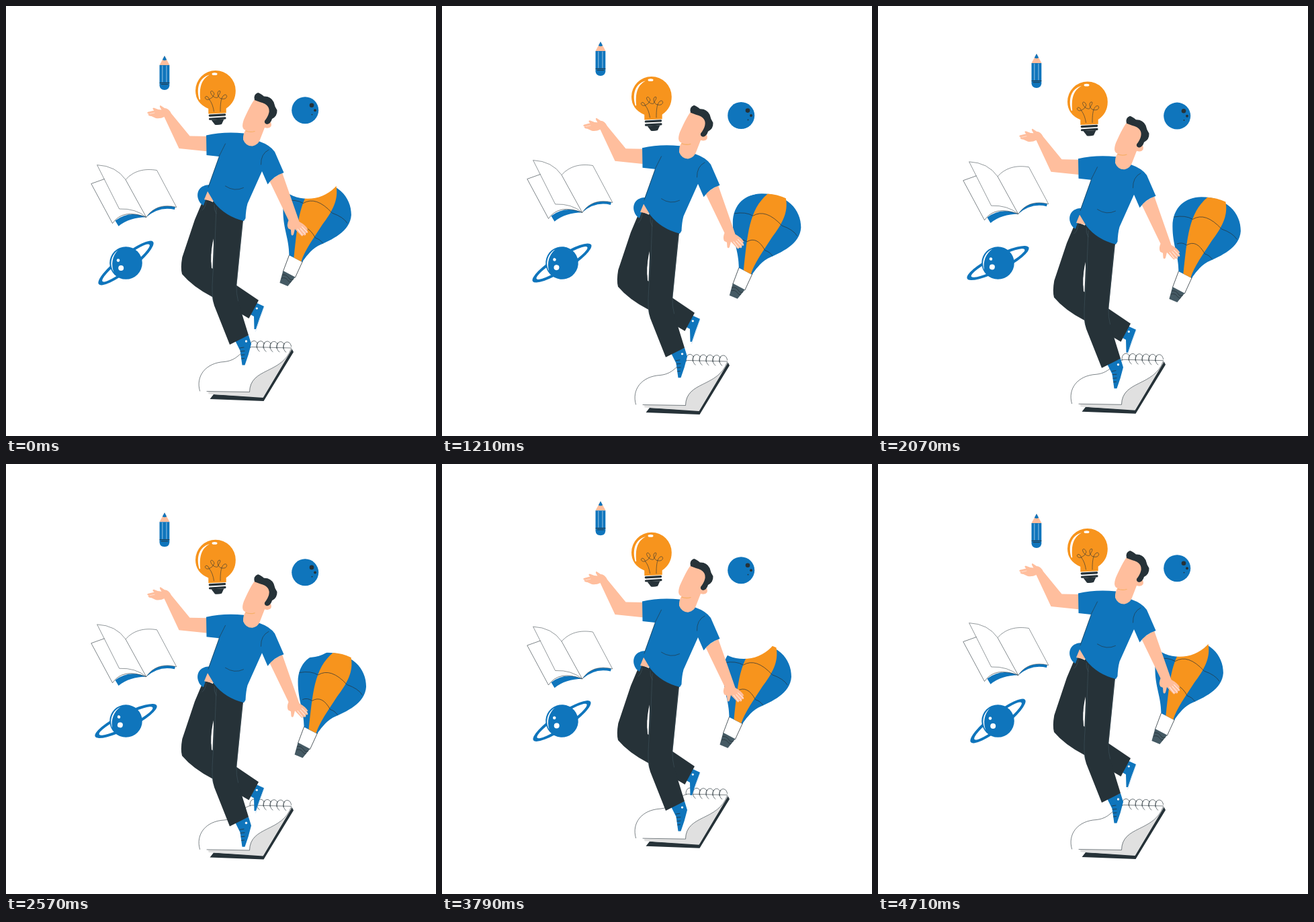
These frames come from a looping animation (640 by 640 pixels, 4.78 s). An HTML page with a canvas:

```html
<!DOCTYPE html>
<html lang="en">
<head>
<meta charset="utf-8">
<title>Balancing ideas</title>
<style>
html, body { margin: 0; width: 100%; height: 100%; overflow: hidden; background: #fff; }
canvas { display: block; width: 100vw; height: 100vh; }
</style>
</head>
<body>
<canvas id="stage" width="640" height="640"></canvas>
<script>
const ctx = document.getElementById('stage').getContext('2d');
const BLUE = '#0f75bc', ORANGE = '#f7941d', DARK = '#263238', SKIN = '#ffbe9d';
const GREY = '#e0e0e0', SLATE = '#455a64', WHITE = '#fff';
const LOOP = 4780, FPS = 14, SPAN = 66;

const fill = (color, d) => {
  const path = new Path2D(d);
  return () => { ctx.fillStyle = color; ctx.fill(path); };
};
const line = (d, width = 0.7, color = DARK) => {
  const path = new Path2D(d);
  return () => { ctx.strokeStyle = color; ctx.lineWidth = width; ctx.stroke(path); };
};
const oval = (color, x, y, rx, ry = rx, turn = 0) => () => {
  ctx.fillStyle = color;
  ctx.beginPath();
  ctx.ellipse(x, y, rx, ry, turn, 0, Math.PI * 2);
  ctx.fill();
};

const pencil = [
  fill(SKIN, 'M236 74L228.5 88H243.5Z'),
  fill(BLUE, 'M236 74L232.8 80Q236 82 239.2 80Z'),
  fill(BLUE, 'M228.5 88H243.3V118.5Q242.5 125 236 125Q229.2 125 228.5 118.5Z'),
  line('M232.8 89V113M238.9 89V113', 0.8, '#b9d6ec'),
  line('M229 114.3H243M231 116.6H241', 0.9)
];

const bulb = [
  fill(ORANGE, 'M301.3 160.5L301.2 152.8Q282 144.5 282 126A29.9 30 0 0 1 341.8 126Q341.8 143 327.7 152.5V159.2Z'),
  fill(WHITE, 'M287.8 139.5C282.5 121 288 106.5 303 102.3C291 109.5 287.5 120 289.2 139Z'),
  oval(WHITE, 310.5, 101.2, 4, 1.9),
  line('M309.5 157Q308 146 302.5 139C296 141 294.5 134 299 134.5Q302 136 302.5 139Q309 136 310 131C308 124.5 303 126 305 130C307 135 312 137 314.5 136.5C318 131 321 125.5 317 126.5C313.5 128 315 135 319 137.5Q322 139 326 138C331 135 328 130 324 133C319.5 137 319 147 319 157', 0.6),
  line('M303.2 163.1L325.6 161.9', 3.1),
  line('M303.4 168.2L326 166.9', 3.1),
  fill(DARK, 'M305.5 169.5L324.5 168.5L321 176Q316 177.4 311 176.8Z')
];

const moon = [
  oval(BLUE, 445.2, 155.2, 20),
  oval(DARK, 455, 147.8, 3.3),
  oval(DARK, 460, 155.3, 2),
  oval(DARK, 455.5, 161.6, 0.9)
];

const BACK_PAGE = 'M146.5 257.5L126.8 264.5L158.5 323.5Q174 301 208.5 314.3';
const RIGHT_PAGE = 'M178 258.5C190 245 206 241.5 224.5 244.5L253.8 299.5Q224 292 208.7 314.3Z';
const FLYING_PAGE = 'M136 236.6Q164 238 178 258.5L208.7 314.3Q193 301 169 302Z';
const book = [
  fill(WHITE, BACK_PAGE),
  fill(BLUE, 'M162.5 319.5L167.5 327.7Q184 314.5 209 314.3Q183 303.5 162.5 319.5Z'),
  fill(BLUE, 'M208.7 314.3Q222 293.5 252 298.7L251 303Q228 297.5 208.7 314.3Z'),
  line(BACK_PAGE, 0.6),
  fill(WHITE, RIGHT_PAGE), line(RIGHT_PAGE, 0.5),
  fill(WHITE, FLYING_PAGE), line(FLYING_PAGE, 0.5)
];

const TILT = -0.662;
const planet = [
  oval(BLUE, 0, 0, 51.3, 12, TILT),
  oval(WHITE, 0, 0, 44.5, 7.8, TILT),
  oval(BLUE, 0, 0, 24.3),
  fill(WHITE, 'M-18 14C-25 3 -23 -11 -12 -19C-20.5 -10 -22.5 2 -18 14Z'),
  oval(WHITE, -11.5, -3.9, 2.3),
  oval(WHITE, -7.3, 7.5, 4)
];

const notepad = [
  fill(DARK, 'M303.5 585L309 578L383 582L425.5 510.5L428 515L383.5 588Z'),
  fill(GREY, 'M301 574L301.5 577.5L382.5 583L425 512L400 520L350 574Z'),
  fill(WHITE, 'M287.5 573C283 551 297 531 325 529.5C348 527 350 510 366 507.5L425 509C413 548 363 538 362.5 574.5Z'),
  line('M288.5 573C282 551 297 531 325 529.5C348 527 350 510 366 507.5L424.5 509', 0.6),
  line('M424.5 510C411 548 363 538 362.5 574.5L299 573.5', 0.6),
  () => {
    ctx.strokeStyle = DARK;
    ctx.lineWidth = 0.65;
    for (let i = 0; i < 6; i++) {
      ctx.beginPath();
      ctx.ellipse(369 + i * 9.9, 506 + i * 0.3, 6, 7.5, 0, 2.8, i < 5 ? 5.7 : 6.2);
      ctx.stroke();
      if (i < 5) {
        ctx.beginPath();
        ctx.ellipse(379 + i * 9.9, 506.5 + i * 0.3, 5.5, 8, 0, 1.9, 4);
        ctx.stroke();
      }
    }
  }
];

const ENVELOPE = 'M447 395C447 370 438 356 438 328C438 300 457 284.3 481 284.3C518 284.3 540 308 539.5 335C538 360 510 372 490 381C478 388 471 399 466.5 405Z';
const balloon = [
  fill(WHITE, 'M447 395L438 419L456 428L467 404Z'),
  fill(BLUE, ENVELOPE),
  fill(ORANGE, 'M490 284.7C462 308 460 345 454 398.5L465 404.3C470 388 483 370 496 350C511 330 521 313 517 291.5Q504 285.5 490 284.7Z'),
  line('M440.5 314Q457 311 468 317.5Q487 306 511 332Q528 338 533.5 347M445 354Q452 351 459 356Q474 347 486 369Q493 371 497 377'),
  line('M447 395L438 419M467 404L456 428', 0.8),
  fill(SLATE, 'M438 418L456 427.5L445 441L433 436Z'),
  line('M437 424Q443 423 446 428T453 431M436 429Q441 427 445 432T450 434', 0.8)
];

const man = [
  // back leg and shoe
  fill(BLUE, 'M373 442L384 447Q377 465 372 481L369.5 481L369 462L363.5 459Z'),
  line('M384 448L371.5 484', 0.6, '#b9d6ec'),
  oval(WHITE, 373.3, 450, 1.6),
  fill(DARK, 'M294.5 286L281 318L262.3 374Q259.5 390 262 399Q278 418 307 433L361.5 465L376 438L342 415L306 390Q304 370 309 350L315 295Z'),
  fill(WHITE, 'M310 342Q304.5 362 305.5 380L307.5 391L309 372Z'),
  // front shoe and leg
  fill(BLUE, 'M341 498L361 490L365 503Q361 520 355.5 534.5H351.5L348.5 513Z'),
  line('M348 509L354 508M349 514L355 513.5M350 519.5L355 519M350.5 525L354.5 524.5', 0.8),
  oval(WHITE, 357.5, 499, 1.7),
  fill(DARK, 'M308 289L353 319L343 418Q343 430 346.5 443L361 490L333 504L310 446Q305.5 433 306.5 410L309 355Z'),
  line('M313 300L311 352L307.5 405Q306 430 308.5 440M351.5 323L343 415Q342.5 428 345.5 439M298 291Q297 300 292 304M310 296Q309 303 313 309', 0.5, SLATE),
  // shirt
  fill(BLUE, 'M304 266C288 266 283 277 286 287Q288 294 294 297L300 280Z'),
  fill(SKIN, 'M300 276L295 288L312 291.5L306 277Z'),
  // left arm
  fill(SKIN, 'M301 194L273.5 193.5L246 160Q242 152 236 152L230 148Q227 148 231.5 154.5Q226 154.5 220 151.5Q216.5 152 220.5 155.5L211 157.8Q209 160 212.5 160.5L211.5 162Q213 164 216.5 164L223 167Q230 168 235.5 165L257.5 212L301 216.5Z'),
  line('M214 160.5L221 159', 0.5, WHITE),
  // right arm
  fill(SKIN, 'M392 260L420.5 319Q417.5 326 420 331L424 333L424.5 340Q426 343 428 340L430 332L439.5 342Q441.5 343.5 442 341L445.5 341.5Q447 340 446 338L449 338Q450 336 447.5 333L449.5 332.5Q446 326 436.5 321L411 248Z'),
  line('M434 332L441 341M438 331L445.5 339.5M440.5 328.5L448 336', 0.9, WHITE),
  fill(BLUE, 'M298 192.5Q324 186.5 354 189.5L377 201.5Q393 207 400 217L413.5 248Q398 253 389.5 265.5L381 246L359.5 294Q357 303 356.5 316L354 320Q326 313 310 292.5L299 274L317 224L298.5 222Z'),
  line('M317 224L326.5 205M301 270L317 225M379.5 236Q379 220 391 214M326.5 268Q340 277 353.5 270.5', 0.6),
  // head
  fill(SKIN, 'M357 184Q352.5 190 353 199Q357 209 367 208.5Q375 207 378 199L385 181Q392 183 394.5 179Q396 174 392 171L393 148L372 137Q366 142 354 169Q349 183 357 185Z'),
  line('M357 186Q363 188.5 370 186.5', 1.3, '#f7b06a'),
  fill(DARK, 'M370 140Q367.5 132 375 129Q379 130 384 134.5Q394 134 398.5 143Q400 150 403.5 155Q404 164 396 168Q394 175 388.5 176Q384 175 385 171Q395 158 390 150Q387 145 378 143Z')
];

// Eased travel between [frame, value] stops.
function glide(n, ...stops) {
  const i = stops.findIndex(s => n <= s[0]);
  if (i < 1) return stops[0][1];
  const [n0, a] = stops[i - 1], [n1, b] = stops[i];
  return a + (b - a) * (1 - Math.cos(Math.PI * (n - n0) / (n1 - n0))) / 2;
}
const loopGlide = (n, ...stops) => glide(n, [0, 0], ...stops, [SPAN, 0]);

function place(part, x, y, turn = 0) {
  ctx.save();
  ctx.translate(x, y);
  ctx.rotate(turn);
  part.forEach(draw => draw());
  ctx.restore();
}

function render(ms) {
  const n = Math.floor((ms % LOOP + 5) * FPS / 1000);
  const sway = loopGlide(n, [SPAN / 2, 1]);
  const hop = loopGlide(n, [16.5, 1], [33, 0], [49.5, 1]);
  const drift = loopGlide(n, [25, 1]);
  const bookY = loopGlide(n, [22, -8], [45.5, 7.8]);

  ctx.fillStyle = WHITE;
  ctx.fillRect(0, 0, 640, 640);
  place(notepad, 0, loopGlide(n, [23.5, 24.3], [47.5, -20.5]));
  place(balloon, 26.6 * drift - 25.6, 24.4 * drift - 23.9);
  oval(WHITE, 449, 229.3 + bookY * 0.6, 57.5)();
  place(moon, 0, loopGlide(n, [23, 9.3], [44, 4.6]));
  place(pencil, 0, -21 * hop);
  place(bulb, 0, 17.1 * sway);
  place(book, 0, bookY);
  place(planet, 178.5, 382.5, 0.2 * sway);
  place(man, 0, 36 * sway);
}

ctx.lineCap = ctx.lineJoin = 'round';
const start = performance.now();
function tick() {
  render(performance.now() - start);
  requestAnimationFrame(tick);
}
tick();
</script>
</body>
</html>
```
